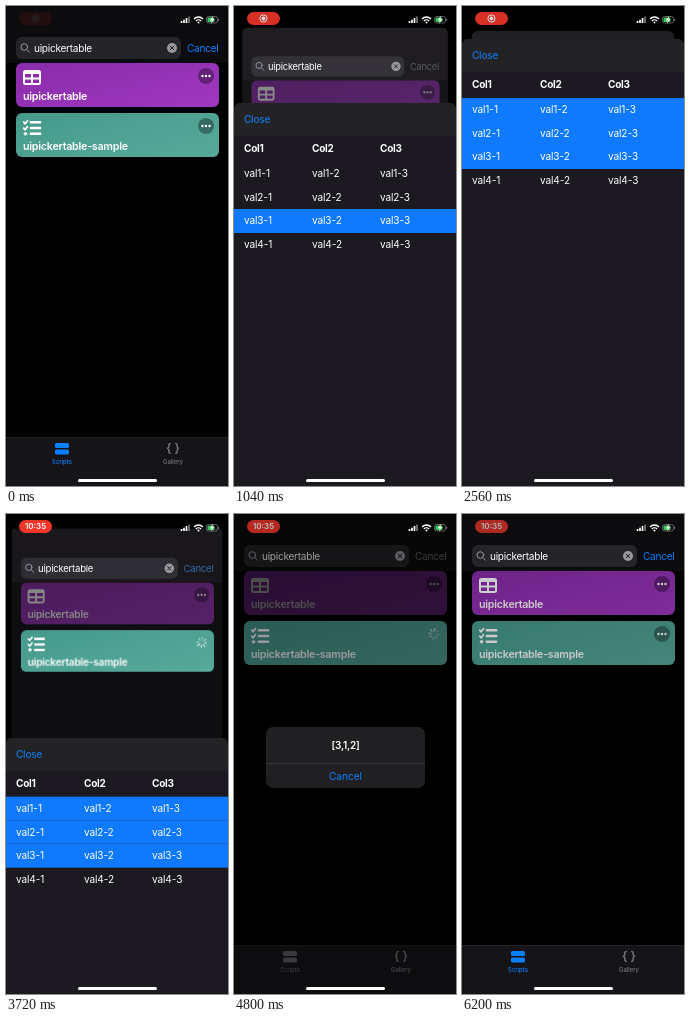
These frames come from a looping animation (222x480 px, 6.24 s). An HTML page:

```html
<!DOCTYPE html>
<html lang="en">
<head>
<meta charset="utf-8">
<title>Picker table</title>
<style>
  html, body { margin: 0; width: 100%; height: 100%; overflow: hidden; background: #000; }
  body { position: relative; color: #fff; font: 10.06px/14px Inter, Roboto, sans-serif; letter-spacing: -.25px; white-space: nowrap; }
  div, span, svg { position: absolute; box-sizing: border-box; }
  .loop { animation: 6240ms linear infinite; }
  .fill { left: 0; top: 0; width: 222px; height: 480px; }

  /* Script list */
  #home { background: #000; transform-origin: 50% 0; overflow: hidden; animation-name: recede; }
  .head { left: 0; top: 0; width: 222px; height: 57px; background: rgba(150,140,170,.08); }
  .field { left: 10px; top: 31px; width: 165px; height: 22px; border-radius: 6px; background: rgba(118,118,128,.24); }
  .tint { color: #0a7fff; animation-name: tint; }
  .card { left: 10px; width: 203px; height: 44px; border-radius: 6px; }
  .card svg { left: 0; top: 0; }
  .card .title { left: 7px; top: 27px; font-size: 10.7px; font-weight: 600; }
  #first { top: 57px; background: linear-gradient(165deg, #8a2cab, #9f38bf); animation-name: first; }
  #second { top: 107px; background: linear-gradient(165deg, #459a8c, #58aa9b); animation-name: second; }
  .dots { animation-name: dots; }
  .busy { left: 0; top: 0; animation-name: busy; }
  .busy #spin { left: 184px; top: 7px; width: 12px; height: 12px; -webkit-mask: conic-gradient(#0006, #000); mask: conic-gradient(#0006, #000); animation: spin 780ms steps(8) infinite; }
  .tabs { left: 0; top: 431px; width: 222px; height: 49px; background: #151418; border-top: 1px solid #222125; }
  .tab { top: 0; width: 60px; height: 30px; text-align: center; font-size: 5.9px; font-weight: 500; letter-spacing: 0; }
  .tab span { left: 0; width: 60px; top: 17px; }
  .shade { background: #000; animation-name: shade; }

  /* Alert */
  #alert { left: 32px; top: 213px; width: 159px; height: 61px; border-radius: 7px; background: #202023; text-align: center; animation-name: alert; }
  #alert span { left: 0; width: 159px; }
  #alert div { left: 0; top: 36px; width: 159px; height: 1px; background: #343438; }

  /* Sheet */
  #sheet { left: 0; top: 33px; width: 222px; height: 447px; border-radius: 6px 6px 0 0; overflow: hidden; background: #1c1a20; animation-name: rise; }
  .bar { left: 0; top: 0; width: 222px; height: 33px; background: #232326; }
  .bar span { left: 10px; top: 9px; color: #1474de; font-weight: 500; }
  .row { left: 0; width: 222px; height: 23.6px; line-height: 23.6px; letter-spacing: -.1px; }
  .row span:nth-child(1) { left: 10px; }
  .row span:nth-child(2) { left: 78px; }
  .row span:nth-child(3) { left: 146px; }
  .row.top { font-weight: 700; letter-spacing: -.25px; }
  .pick1 { animation-name: pick1; }
  .pick2 { animation-name: pick2; }
  .picked { background: #0f7aff; }

  /* Status bar */
  #pill { left: 13px; top: 5.5px; width: 33px; height: 13px; border-radius: 6.5px; background: #f5372b; animation-name: pulse; }
  #pill span { left: 0; width: 33px; top: 0; line-height: 13px; text-align: center; font-size: 8px; font-weight: 600; letter-spacing: 0; animation-name: clock; }
  #pill svg { left: 0; top: 0; animation-name: record; }
  .grip { left: 72px; top: 472.5px; width: 79px; height: 3px; border-radius: 2px; background: #fff; }

  @keyframes recede {
    0%, 14.1% { transform: none; border-radius: 0; background: #000; animation-timing-function: cubic-bezier(.32,.72,0,1); }
    22.44%, 58.49% { transform: translateY(25px) scale(.915); border-radius: 7px; background: #18171a; animation-timing-function: cubic-bezier(.32,.72,0,1); }
    66.5%, 100% { transform: none; border-radius: 0; background: #000; }
  }
  @keyframes rise {
    0%, 14.1% { transform: translateY(447px); animation-timing-function: cubic-bezier(.32,.72,0,1); }
    22.44%, 58.49% { transform: none; animation-timing-function: cubic-bezier(.32,.72,0,1); }
    66.5%, 100% { transform: translateY(447px); }
  }
  @keyframes tint {
    0%, 14.1% { color: #0a7fff; }
    16.5%, 58.49% { color: #58585c; }
    61%, 66.19% { color: #0a7fff; }
    70.83%, 88.14% { color: #606065; }
    91.67%, 100% { color: #0a7fff; }
  }
  @keyframes first {
    0%, 7% { opacity: 1; }
    10%, 93.6% { opacity: .5; }
    100% { opacity: .84; }
  }
  @keyframes second {
    0%, 4% { opacity: 1; }
    6.5% { opacity: .75; }
    10%, 93.6% { opacity: 1; }
    96% { opacity: .76; }
    100% { opacity: .8; }
  }
  @keyframes dots {
    0%, 8.97% { opacity: 1; }
    8.98%, 93.6% { opacity: 0; }
    93.61%, 100% { opacity: 1; }
  }
  @keyframes busy {
    0%, 8.97% { opacity: 0; }
    8.98%, 93.6% { opacity: 1; }
    93.61%, 100% { opacity: 0; }
  }
  @keyframes spin { to { transform: rotate(1turn); } }
  @keyframes shade {
    0%, 66.19% { opacity: 0; }
    70.83%, 88.14% { opacity: .4; }
    91.67%, 100% { opacity: 0; }
  }
  @keyframes alert {
    0%, 66.19% { opacity: 0; transform: scale(1.2); }
    66.67% { opacity: .14; transform: scale(1.17); animation-timing-function: ease-out; }
    70.83%, 88.14% { opacity: 1; transform: none; }
    91.67%, 100% { opacity: 0; transform: none; }
  }
  @keyframes pick1 {
    0%, 28.2% { background: transparent; }
    28.21%, 100% { background: #0f7aff; }
  }
  @keyframes pick2 {
    0%, 36.86% { background: transparent; }
    36.87%, 100% { background: #0f7aff; }
  }
  @keyframes pulse {
    0% { opacity: .1; }
    6%, 10% { opacity: 1; }
    16.67% { opacity: .88; }
    24% { opacity: .72; }
    34% { opacity: 1; }
    41% { opacity: .88; }
    47% { opacity: .72; }
    59.6% { opacity: 1; }
    66.67% { opacity: .93; }
    75% { opacity: .7; }
    88% { opacity: 1; }
    100% { opacity: .68; }
  }
  @keyframes record {
    0%, 49.7% { opacity: 1; }
    49.71%, 100% { opacity: 0; }
  }
  @keyframes clock {
    0%, 49.7% { opacity: 0; }
    49.71%, 100% { opacity: 1; }
  }
</style>
</head>
<body>
<svg width="0" height="0">
  <defs>
    <g id="more">
      <circle cx="190" cy="13" r="8" fill="#000" fill-opacity=".35"/>
      <path d="M186.5 13h0m3.5 0h0m3.5 0h0" stroke="#fff" stroke-width="2.4" stroke-linecap="round"/>
    </g>
  </defs>
</svg>

<div id="home" class="fill loop">
  <div class="head"></div>
  <div class="field"></div>
  <svg class="fill" fill="none" stroke-linecap="round">
    <g stroke="#98989f"><circle cx="18.3" cy="41" r="3.3"/><path d="M20.8 43.6l2.6 2.6"/></g>
    <circle cx="166" cy="42" r="5" fill="#98989f"/>
    <path d="M164.2 40.2l3.6 3.6m0-3.6l-3.6 3.6" stroke="#1c1c1f"/>
  </svg>
  <span style="left:28px;top:35px">uipickertable</span>
  <span class="tint loop" style="left:181px;top:35px">Cancel</span>

  <div id="first" class="card loop">
    <svg width="203" height="44">
      <path fill="#fff" fill-rule="evenodd" d="M9.5 7h13a2.5 2.5 0 0 1 2.5 2.5v10a2.5 2.5 0 0 1-2.5 2.5h-13a2.5 2.5 0 0 1-2.5-2.5v-10a2.5 2.5 0 0 1 2.5-2.5zM9 11h6v3.5h-6zM17 11h6v3.5h-6zM9 16.5h6v3.5h-6zM17 16.5h6v3.5h-6z"/>
      <use href="#more"/>
    </svg>
    <span class="title">uipickertable</span>
  </div>

  <div id="second" class="card loop">
    <svg width="203" height="44" fill="none">
      <g stroke="#fff" stroke-linecap="round" stroke-linejoin="round">
        <path stroke-width="1.7" d="M7.7 9.2l1.5 1.6 2.4-3.2M7.7 15.2l1.5 1.6 2.4-3.2"/>
        <path stroke-width="2.4" d="M14.8 9.2h9.4M14.8 15h9.4M14.8 20.8h9.4"/>
        <circle cx="9.5" cy="20.8" r="1.3" fill="#fff"/>
      </g>
      <use href="#more" class="dots loop"/>
    </svg>
    <div class="busy loop">
      <svg id="spin" viewBox="-6 -6 12 12">
        <circle r="3.9" fill="none" stroke="#fff" stroke-width="3.4" pathLength="8" stroke-dasharray=".34 .66"/>
      </svg>
    </div>
    <span class="title">uipickertable-sample</span>
  </div>

  <div class="tabs">
    <div class="tab tint loop" style="left:26px">
      <svg width="60" height="20" style="left:0;top:0" fill="currentColor">
        <rect x="23" y="5" width="14" height="5" rx="1.5"/><rect x="23" y="11.5" width="14" height="5" rx="1.5"/>
      </svg>
      <span>Scripts</span>
    </div>
    <div class="tab" style="left:137px;color:#77777c">
      <span style="top:3px;font-size:12px;font-weight:600">{ }</span>
      <span>Gallery</span>
    </div>
  </div>
  <div class="shade fill loop"></div>
</div>

<div id="alert" class="loop">
  <span style="top:11px;font-weight:600">[3,1,2]</span>
  <div></div>
  <span style="top:42px;color:#0a7fff;letter-spacing:0">Cancel</span>
</div>

<div id="sheet" class="loop">
  <div class="bar"><span>Close</span></div>
</div>

<div id="pill" class="loop">
  <svg class="loop" width="33" height="13">
    <circle cx="16.5" cy="6.5" r="3.6" fill="none" stroke="#fff"/><circle cx="16.5" cy="6.5" r="1.9" fill="#fff"/>
  </svg>
  <span class="loop">10:35</span>
</div>
<svg class="fill" fill="none">
  <path stroke="#fff" stroke-width="1.7" d="M175.5 17v-2M178 17v-3.3M180.5 17v-5"/>
  <path stroke="#777" stroke-width="1.7" d="M183 17v-6.5"/>
  <path stroke="#fff" stroke-width="1.4" d="M188 12.9a6.4 6.4 0 0 1 9 0M189.9 14.9a3.7 3.7 0 0 1 5.2 0"/>
  <circle cx="192.5" cy="16.5" r="1" fill="#fff"/>
  <rect x="200.5" y="10.5" width="11" height="6.5" rx="2" stroke="#77777b" stroke-width=".8"/>
  <rect x="201.5" y="11.5" width="7" height="4.5" rx="1" fill="#34c759"/>
  <path d="M212.7 12.8v2" stroke="#77777b"/>
  <path d="M207 9.8l-3.2 4.5h2l-.8 3.5 3.3-4.7h-2z" fill="#fff"/>
</svg>
<div class="grip"></div>

<script>
  const sheet = document.getElementById('sheet');
  const rowHeight = 23.6;

  function addRow(top, className, label) {
    const row = document.createElement('div');
    row.className = 'row ' + className;
    row.style.top = top + 'px';
    for (let col = 1; col <= 3; col++) {
      const cell = document.createElement('span');
      cell.textContent = label(col);
      row.append(cell);
    }
    sheet.append(row);
  }

  addRow(34, 'top', col => 'Col' + col);
  ['pick1 loop', 'pick2 loop', 'picked', ''].forEach((state, i) =>
    addRow(59 + i * rowHeight, state, col => `val${i + 1}-${col}`));
</script>
</body>
</html>
```
